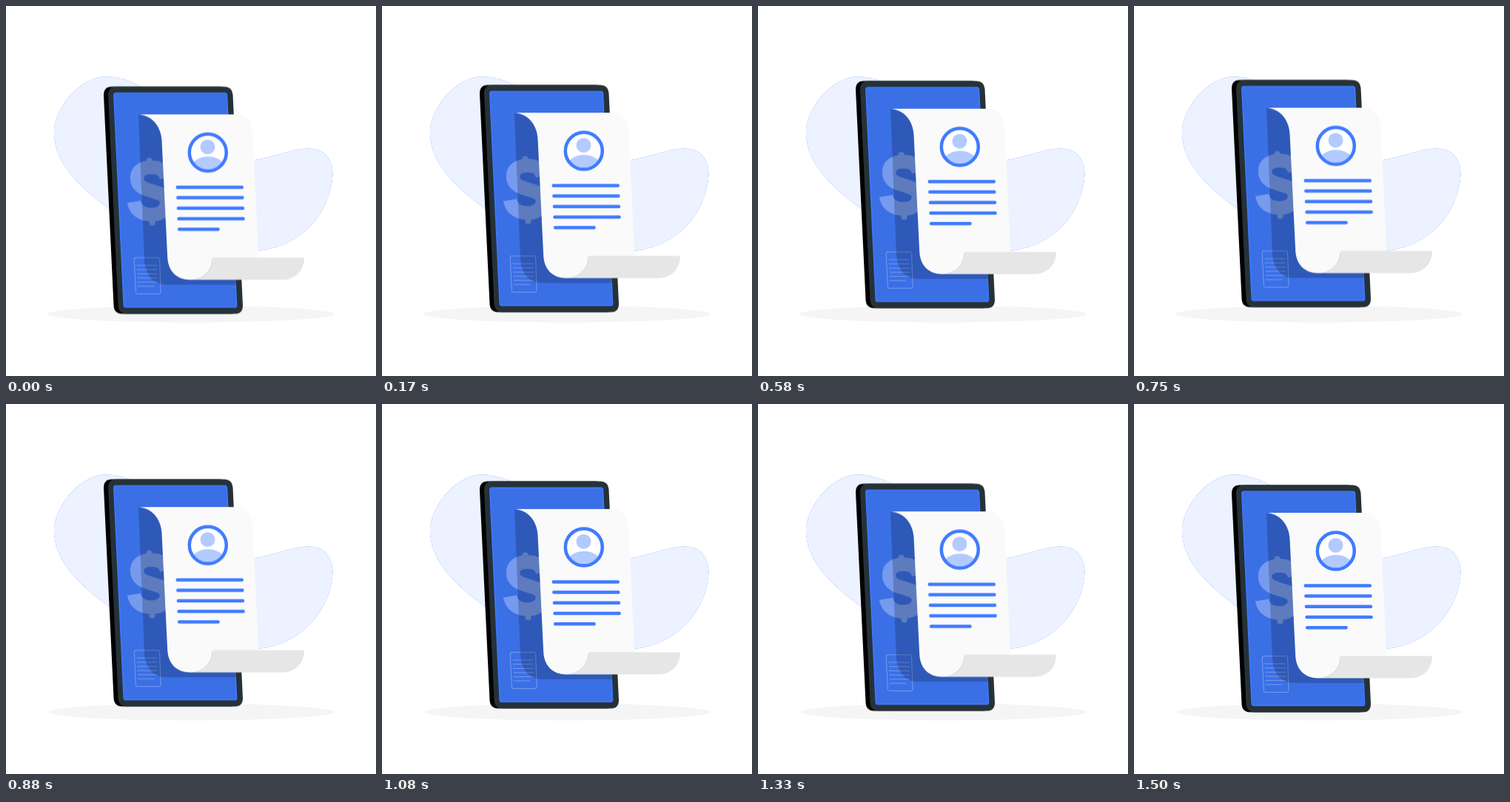
An HTML page without scripts for the animation above (1.54 s loop, 500 by 500 pixels).

```html
<!DOCTYPE html>
<html lang="en">
<head>
<meta charset="utf-8">
<title>Floating phone document</title>
<style>
  html, body { margin: 0; width: 100%; height: 100%; overflow: hidden; background: #fff; }
  svg { display: block; width: 100%; height: 100%; }
  .float { animation: float 1540ms linear infinite; }
  @keyframes float {
    0% { transform: translateY(-.5px); }
    46.4% { transform: translateY(-10px); }
    95.2%, 100% { transform: translateY(0); }
  }
  .blue { fill: #407bff; }
  .pale { fill: #b3caff; }
  .line { fill: none; stroke-linecap: round; }
</style>
</head>
<body>
<svg viewBox="0 0 500 500">
  <defs>
    <path id="blob" d="M135 95.5C155 95.5 170 102 183 109C240 145 260 205 325 209C355 208 385 192.5 409 192.5C430 192.5 441.5 206 441.5 228C438 280 400 324 341 331C270 340 200 320 138 273C100 245 65 212 65 172C65 138 100 95.5 135 95.5Z"/>
    <path id="body" d="M149 109.5H295Q305.5 109.5 306.5 120L320 405Q320 416.4 310 416.4H163Q152 416.4 151.5 405L138 121Q138 109.5 149 109.5Z"/>
    <clipPath id="portrait"><circle cx="272.8" cy="198.6" r="25"/></clipPath>
  </defs>

  <use href="#blob" class="blue"/>
  <use href="#blob" fill="#fff" opacity=".9"/>
  <ellipse cx="250" cy="416.24" rx="193.9" ry="11.3" fill="#f5f5f5"/>

  <g class="float">
    <!-- phone -->
    <use href="#body" x="-6"/>
    <use href="#body" fill="#263238"/>
    <path d="M148.5 118.2H295.5Q298.4 118.2 298.5 121L311.6 405Q311.7 407.6 309 407.6H162Q159.4 407.6 159.2 405L145.8 121Q145.7 118.2 148.5 118.2Z" fill="#3a6fe6" stroke="#407bff" stroke-width="1.5"/>

    <!-- dollar sign -->
    <g class="line" stroke="#fff" opacity=".3">
      <path d="M173 265C175 277 184 282.5 197 282.5C212 282.5 217 274 217 266C217 246 177 256 177 233C177 223 185 218.5 197 218.5C208 218.5 215 223 217 233" stroke-width="18.5" stroke-linecap="butt"/>
      <path d="M193.6 209.5L194 216M197.3 286L197.6 293.3" stroke-width="8"/>
    </g>

    <!-- small document -->
    <g class="line" stroke="#fff" stroke-width=".8" opacity=".4">
      <path d="M175 340.7H205.5q2 0 2.1 2L209 387.5q0 2-2 2H177.5q-2 0-2.1-2L173.2 342.7q-.1-2 1.8-2Z"/>
      <path d="M177 351H204M177.2 356.7H204.3M177.4 362.4H204.6M177.6 368H204.8M177.8 373.6H205M178 379.2H200"/>
    </g>

    <!-- paper -->
    <path d="M179 147L187 344C188 364 199 377 216 377H311.3V340H230L220 160Z" opacity=".2"/>
    <path d="M179 147H313C326 147 332.8 158 333.4 172L341.3 341H279L249 370.5C231 370.5 219 359 218.2 340L210.5 182C209.5 163 197 148 179 147Z" fill="#fafafa"/>
    <path d="M279 340.5H403C403 358 391 370.5 373 370.5H249C266 370.5 279 358 279 340.5Z" fill="#e6e6e6"/>
    <path d="M249 370.5C266 370.5 279 358 279 340.5L240 345Z" fill="#fafafa"/>

    <!-- portrait -->
    <circle cx="272.8" cy="198.6" r="25" fill="#fff"/>
    <g class="pale" clip-path="url(#portrait)">
      <circle cx="272.5" cy="190.9" r="10"/>
      <ellipse cx="273" cy="222" rx="24" ry="18"/>
    </g>
    <circle cx="272.8" cy="198.6" r="25" fill="none" stroke="#407bff" stroke-width="4.5"/>

    <!-- text rows -->
    <path class="line" stroke="#407bff" stroke-width="4.5" d="M231.7 245.4H318.8M232.3 259.6H319.4M232.9 273.8H320M233.5 288H320.6M234.1 302.2H286.6"/>
  </g>
</svg>
</body>
</html>
```
